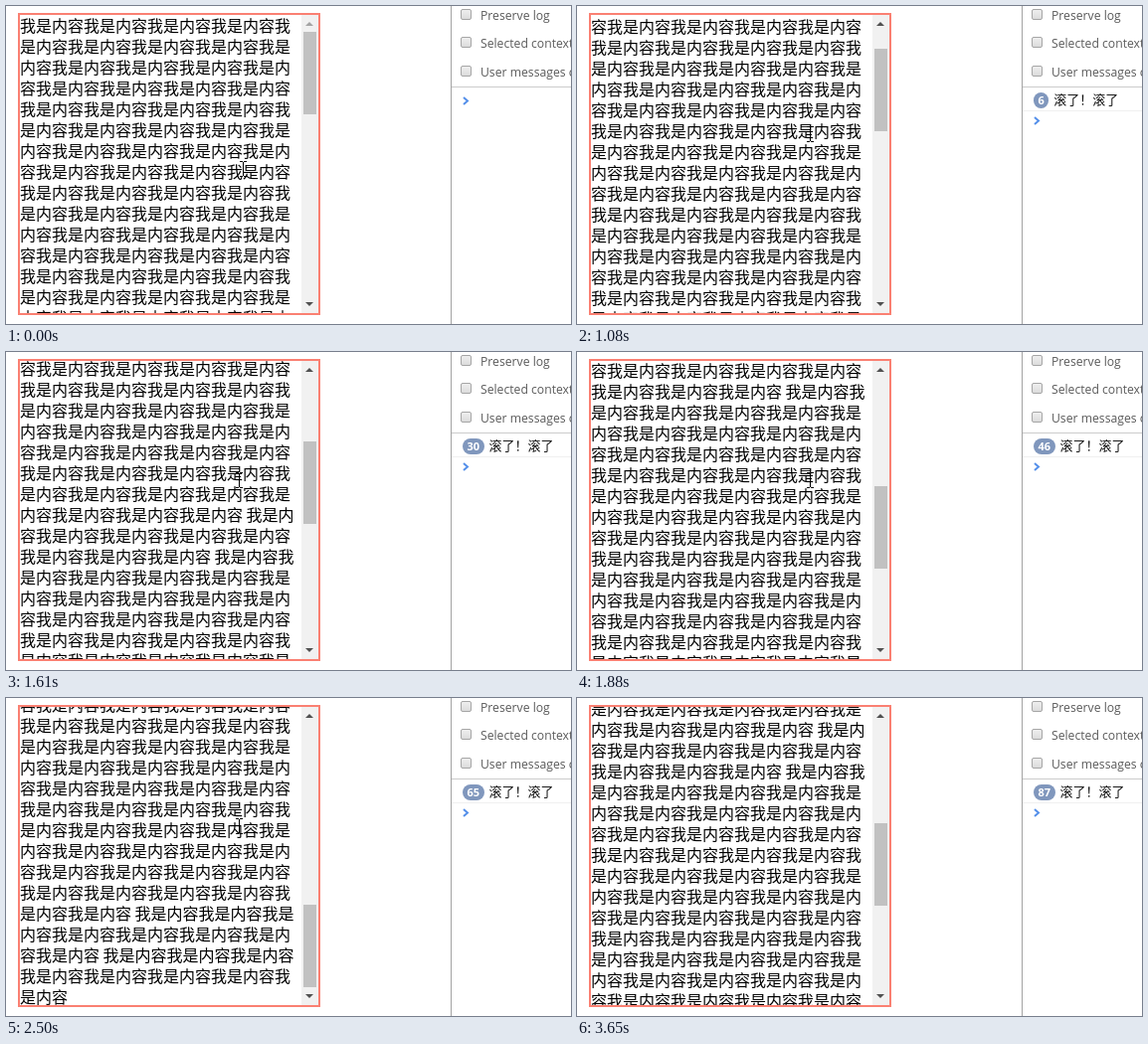
Write an HTML page that moves like this. It is 568 px wide and 320 px high and loops after 4.26 s.

```html
<!DOCTYPE html>
<html lang="zh-CN">
<head>
<meta charset="utf-8">
<title>Scroll log</title>
<style>
  html, body { margin: 0; width: 100%; height: 100%; overflow: hidden; background: #fff; }
  #stage { position: relative; width: 568px; height: 320px; overflow: hidden; background: #fff; }
  #stage * { position: absolute; box-sizing: border-box; }

  #box { left: 12px; top: 7px; width: 304px; height: 304px; border: 2px solid salmon; overflow: hidden; }
  #text {
    left: 0; top: 0; width: 283px; color: #000;
    font: 16px/21px "Noto Sans CJK SC", "Noto Sans CJK", sans-serif;
  }
  #bar { right: 0; top: 0; width: 17px; height: 300px; background: #f1f1f1; }
  #thumb { left: 2px; top: 17px; width: 13px; height: 83px; background: #c1c1c1; }
  #bar svg { left: 0; top: 0; fill: #505050; }
  #bar .off { fill: #a3a3a3; }

  #panel { left: 447px; top: 0; width: 121px; height: 320px; border-left: 1px solid #a3a3a3; overflow: hidden; }
  .option { left: 29px; white-space: nowrap; color: #5a5a5a; font: 12.2px/16px "Open Sans", sans-serif; }
  .option i {
    left: -20px; top: 1px; width: 11px; height: 11px;
    border: 1px solid #a6a6a6; border-radius: 2px;
    background: linear-gradient(#eee, #dcdcdc);
  }
  .rule { left: 0; width: 100%; height: 1px; background: #ccc; }
  #log { left: 0; top: 82px; width: 100%; height: 24px; border-bottom: 1px solid #f0f0f0; }
  #line { left: 11px; top: 5px; display: flex; white-space: nowrap; }
  #stage #line > * { position: static; }
  #count {
    height: 16px; padding: 0 4.5px; margin-right: 5px; border-radius: 8px;
    background: #8097bd; color: #fff; font: bold 11px/16px "Open Sans", sans-serif;
  }
  #msg { margin-top: -1px; color: #111; font: 13px/16px "Noto Sans CJK SC", "Noto Sans CJK", sans-serif; }
  #prompt { left: 10px; top: 90px; fill: none; stroke: #5590ea; stroke-width: 2; }
  #cursor { left: 0; top: 0; fill: #000; }
</style>
</head>
<body>
<div id="stage">
  <div id="box">
    <div id="text"></div>
    <div id="bar">
      <div id="thumb"></div>
      <svg width="17" height="300">
        <path id="up" d="M4 11 L8 7 L12 11Z"/>
        <path id="down" d="M4 289 L8 293 L12 289Z"/>
      </svg>
    </div>
  </div>
  <div id="panel">
    <div class="option" style="top:2px"><i></i>Preserve log</div>
    <div class="option" style="top:30px"><i></i>Selected context only</div>
    <div class="option" style="top:59px"><i></i>User messages only</div>
    <div class="rule" style="top:81px"></div>
    <div id="log"><div id="line"><span id="count"></span><span id="msg">滚了！滚了</span></div></div>
    <svg id="prompt" width="10" height="12"><path d="M2 2 L6 5.5 L2 9"/></svg>
  </div>
  <svg id="cursor" width="7" height="16"><path d="M0 0H3V1H4V0H7V1H4V15H7V16H4V15H3V16H0V15H3V1H0Z"/></svg>
</div>
<script>
  const LOOP = 4260, MAX_SCROLL = 666, THUMB_TRAVEL = 183;
  const $ = id => document.getElementById(id);

  $('text').textContent = [80, 8, 88, 8, 8].map(n => '我是内容'.repeat(n)).join(' ');

  // time, scroll offset, log count, cursor x, cursor y (no x: hidden)
  const steps = [
    [0, 0, 0, 235, 156],
    [120, 0, 0, 233, 138],
    [240, 0, 0, 231, 121],
    [1080, 62, 6, 231, 121],
    [1220, 100, 12, 231, 121],
    [1340, 127, 17, 231, 121],
    [1490, 190, 24, 231, 121],
    [1610, 234, 30, 231, 121],
    [1760, 335, 40, 231, 121],
    [1880, 400, 46, 231, 121],
    [2190, 433, 49, 231, 121],
    [2350, 560, 57, 231, 121],
    [2500, 664, 65, 231, 121],
    [2640, 666, 67, 231, 124],
    [2760, 666, 67, 230, 128],
    [3070, 557, 75, 230, 128],
    [3220, 440, 83, 230, 128],
    [3350, 366, 87, 230, 128],
    [3500, 366, 87, 244, 163],
    [3650, 366, 87]
  ];

  const move = (id, x, y) => { $(id).style.transform = `translate(${x}px, ${y}px)`; };
  const show = (id, on) => { $(id).style.visibility = on ? 'visible' : 'hidden'; };

  function draw([, scroll, count, x, y]) {
    move('text', 0, -scroll);
    move('thumb', 0, Math.floor(scroll / MAX_SCROLL * THUMB_TRAVEL));
    $('up').classList.toggle('off', scroll === 0);
    $('down').classList.toggle('off', scroll === MAX_SCROLL);
    $('count').textContent = count;
    show('log', count > 0);
    move('prompt', 0, count > 0 ? 20 : 0);
    show('cursor', x !== undefined);
    if (x !== undefined) move('cursor', x, y);
  }

  const start = performance.now();
  let current;
  function tick() {
    const t = (performance.now() - start) % LOOP;
    const step = steps.filter(s => s[0] <= t).pop();
    if (step !== current) draw(current = step);
    requestAnimationFrame(tick);
  }
  tick();
</script>
</body>
</html>
```
